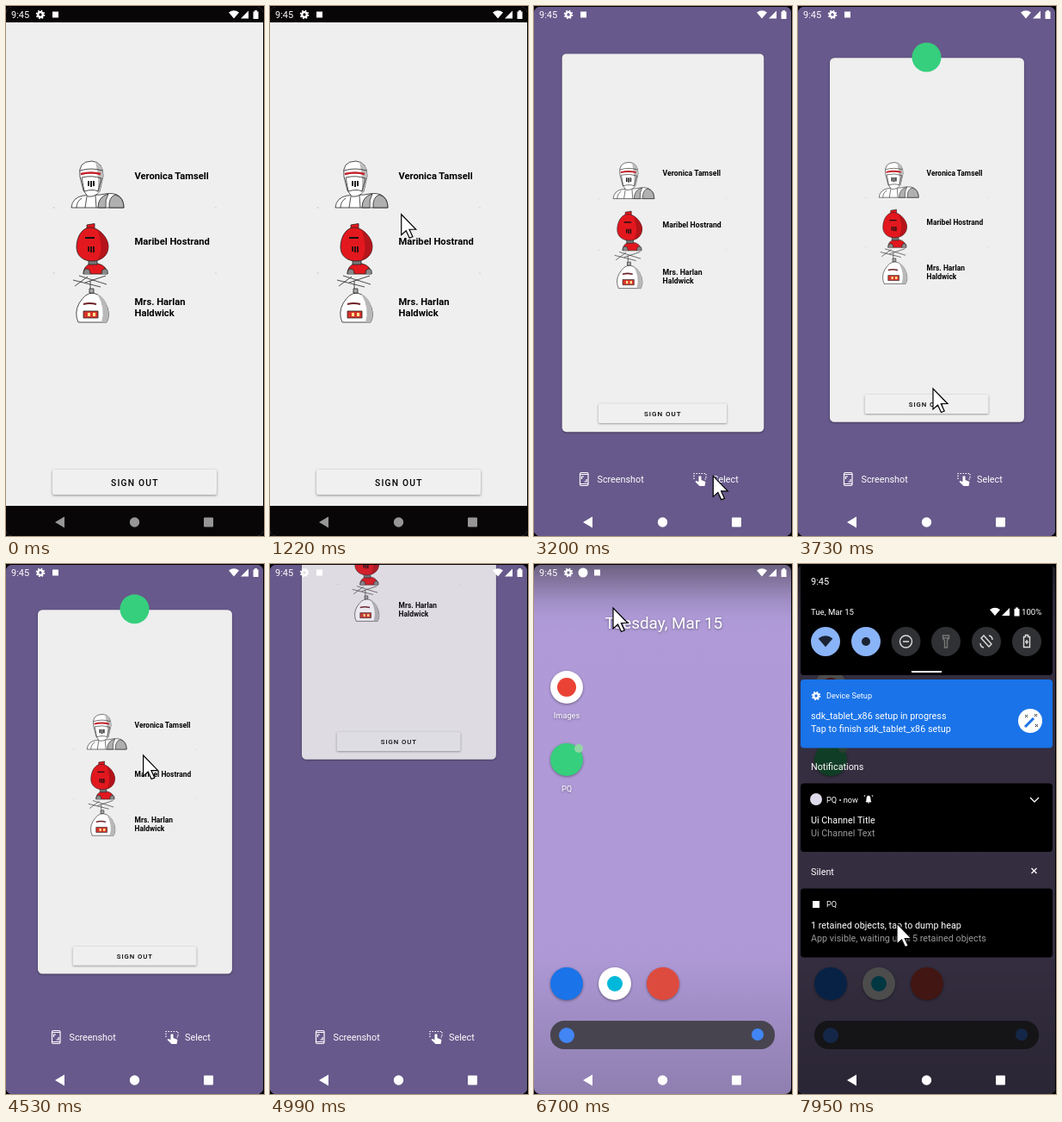
These frames come from a looping animation (300 by 615 pixels, 7990 ms). An HTML page:

```html
<!DOCTYPE html>
<html lang="en">
<head>
<meta charset="utf-8">
<title>Phone screen</title>
<style>
html, body { margin: 0; width: 100%; height: 100%; overflow: hidden; background: #000; }
svg { display: block; width: 100%; height: 100%; font: 10.8px Roboto, sans-serif; color: #fff; }
.line { fill: none; stroke: currentColor; }
.ink { stroke: #222; stroke-width: .8; }
.bold { font-size: 11.2px; font-weight: 700; fill: #000; }
.soft { filter: drop-shadow(0 1px 1.5px #0006); }
.small { font-size: 9.2px; }
.white { fill: #fff; }
.grey { fill: #999; }
</style>
</head>
<body>
<svg viewBox="0 0 300 615" preserveAspectRatio="none">
<defs>
  <linearGradient id="wall" x2="0" y2="1">
    <stop offset="0" stop-color="#6b607f"/>
    <stop offset=".035" stop-color="#8677a2"/>
    <stop offset=".07" stop-color="#a08ec5"/>
    <stop offset=".1" stop-color="#ad99d5"/>
    <stop offset=".13" stop-color="#b09bd8"/>
    <stop offset=".74" stop-color="#ae99d6"/>
    <stop offset=".85" stop-color="#a08dc5"/>
    <stop offset="1" stop-color="#8f7fb0"/>
  </linearGradient>
  <clipPath id="screen"><rect y="1" width="299" height="614" rx="7"/></clipPath>
  <clipPath id="pulled"><rect id="pullArea" width="300"/></clipPath>
  <g id="gear" class="line">
    <circle r="2.8" stroke-width="2.3"/>
    <circle r="4.5" stroke-width="1.6" stroke-dasharray="1.8 1.734"/>
  </g>
  <path id="wifi" d="M0 4.5L-6-2.5Q0-7 6-2.5Z"/>
  <g id="signals" class="white">
    <use href="#wifi"/>
    <path d="M8 4.5H17V-4.5Z"/>
    <path d="M22.5-3.5H24V-5H27V-3.5H28.5V5H22.5Z"/>
  </g>
</defs>

<g clip-path="url(#screen)">
  <rect width="300" height="615" fill="url(#wall)"/>
  <g id="home">
    <g class="soft white" text-anchor="middle">
      <text x="150.8" y="75" font-size="18.9">Tuesday, Mar 15</text>
      <text x="38" y="179" class="small">Images</text>
      <text x="38" y="264" class="small">PQ</text>
    </g>
    <g class="soft">
      <circle cx="38" cy="143" r="19" fill="#fff"/>
      <circle cx="38" cy="227" r="19" fill="#36cf7d"/>
      <circle cx="38" cy="487" r="19" fill="#1a73e8"/>
      <circle cx="94" cy="487" r="19" fill="#fff"/>
      <circle cx="150" cy="487" r="19" fill="#dd4b3e"/>
    </g>
    <circle cx="38" cy="143" r="11" fill="#ea4335"/>
    <circle cx="52" cy="214" r="5" fill="#93d5a5"/>
    <circle cx="94" cy="487" r="9" fill="#00b8d9"/>
    <rect x="19" y="530" width="261" height="33" rx="16" fill="#47444f"/>
    <circle cx="38" cy="547" r="9" fill="#4285f4"/>
    <circle cx="260" cy="546" r="7" fill="#4285f4"/>
  </g>

  <g id="recents">
    <rect width="300" height="615" fill="#67598b"/>
    <g class="white">
      <text x="73.5" y="553">Screenshot</text>
      <text x="208" y="553">Select</text>
    </g>
    <g class="line" stroke-width="1.2">
      <rect x="53.5" y="541.5" width="9.5" height="15" rx="1.5"/>
      <path d="M53.5 543.5H63M53.5 554.5H63M55.5 549V546H58M61 549V552H58.5"/>
      <path d="M186 549V542.5H200V549H197" stroke-dasharray="1.5 1.5"/>
    </g>
    <path class="white" d="M191.5 546q1.5-1.5 3 0v4l5 2-1 5h-6l-5-5 1-1 3 1Z"/>
  </g>
  <rect id="bars" width="300" height="615" fill="#080606"/>

  <g id="card">
    <g class="soft"><rect id="sheet" y="19" width="300" height="561" fill="#efefef"/></g>
    <path class="line" color="#0002" d="M54 234h3M243 234h2M54 310h3M243 310h2"/>

    <g class="ink" fill="#fff">
      <path d="M76 234Q77 222 90 220L110 219Q122 216 129 219Q137 223 137 234Z"/>
      <path d="M107 234Q107 221 119 218Q115 225 116 234ZM120 234Q119 222 127 219Q137 222 137 234Z" fill="#b0b0b0"/>
      <path d="M88 223Q82 227 82 234M94 221L92 234M104 220L105 234" fill="none"/>
      <path d="M86 198Q83 180 100 180Q113 181 113 197L109 215Q104 222 95 221L90 214Z"/>
      <path d="M104 181Q113 184 113 197L109 215L106 219Q109 203 104 181Z" fill="#bdbdbd" stroke="none"/>
      <path d="M86 191Q99 187 112 191M88 199Q100 196 111 200L107 215Q101 212 91 215Z" fill="none"/>
    </g>
    <path class="line" color="#c3222b" stroke-width="2.5" d="M87 195Q99 192 110 195"/>
    <path class="line" color="#222" stroke-width="2" d="M96 203v6M99 203v7M102 203v6"/>

    <g class="ink" fill="#e3181e">
      <path d="M90 311Q90 301 99 299H107Q117 301 118 311Z"/>
      <path d="M96 293H106V300H96Z" fill="#777"/>
      <path d="M94 254L103 252.5V259H94Z"/>
      <path d="M98 257C108 257 119 269 119 279C119 291 109 296 100 296C90 296 82 290 82 280C82 267 89 257 98 257Z"/>
      <path d="M106 259Q119 269 119 279Q118 292 106 295Q115 283 106 259Z" fill="#b4141a" stroke="none"/>
      <path d="M90 311q0-6 4-6t4 6M111 311q0-6 4-6t3 6" fill="#888"/>
    </g>
    <path class="line" color="#1a1010" stroke-width="1.8" d="M92 269H103M96 279v6M99 279v7M102 279v7"/>

    <g class="ink" fill="#fff">
      <path d="M78 318L110 326M85 313L117 323M92 321L116 313M80 325L95 314M98 319V334" fill="none"/>
      <path d="M84 367Q79 356 85 345Q92 333 101 333Q113 335 118 350Q121 360 117 367Z"/>
      <path d="M106 334Q115 338 118 350Q121 360 117 367H111Q116 350 106 334Z" fill="#b9b9b9" stroke="none"/>
      <path d="M97 328h5v5h-5Z" fill="#aaa"/>
      <path d="M90 354H107V362H90Z" fill="#d8332c"/>
      <path d="M95 356h3v4h-3ZM101 356h3v4h-3Z" fill="#ffe28a" stroke="none"/>
    </g>
    <path class="line" color="#6c2229" stroke-width="2" d="M90 346Q97 344 105 346"/>

    <g class="bold">
      <text x="149.5" y="200.5">Veronica Tamsell</text>
      <text x="149.5" y="276.5">Maribel Hostrand</text>
      <text x="149.5" y="346.5">Mrs. Harlan</text>
      <text x="149.5" y="360">Haldwick</text>
    </g>
    <g class="soft"><rect x="54" y="538" width="191" height="29" rx="2" fill="#f0f0f0"/></g>
    <text x="122" y="556.5" font-size="10.3" font-weight="500" letter-spacing="1.2">SIGN OUT</text>
  </g>
  <circle id="appIcon" cx="149.5" cy="59.5" r="17" fill="#36cf7d"/>

  <g id="status">
    <text class="white" x="6" y="14" font-size="11">9:45</text>
    <use href="#gear" x="40" y="10"/>
    <circle id="note" class="white" cx="57" cy="10" r="5.5"/>
    <rect id="heap" class="white" y="6.5" width="7" height="7"/>
    <use href="#signals" x="265" y="10"/>
  </g>

  <rect id="scrim" width="300" height="615"/>
  <ellipse id="ripple" cx="235.5" cy="597.5" fill="#1c1c1c"/>
  <g id="nav">
    <path d="M57 599L68 592.5V605.5Z"/>
    <circle cx="149.5" cy="599" r="5.7"/>
    <rect x="230" y="593.5" width="11" height="11" rx="1"/>
  </g>

  <g clip-path="url(#pulled)"><g id="stack" class="white">
    <rect x="3" y="134" width="293" height="79.5" rx="4" fill="#1a73e8"/>
    <use href="#gear" x="21" y="153"/>
    <text x="33" y="156" class="small">Device Setup</text>
    <text x="15" y="180">sdk_tablet_x86 setup in progress</text>
    <text x="15" y="195">Tap to finish sdk_tablet_x86 setup</text>
    <circle cx="270" cy="182" r="14"/>
    <path class="line" color="#1a73e8" stroke-width="3" d="M264 189L274 179"/>
    <path class="line" color="#333" d="M264 175l3 3m0-3l-3 3M275 174l3 3m0-3l-3 3M276 186l3 3m0-3l-3 3"/>
    <text x="15" y="239">Notifications</text>
    <rect x="3" y="254.5" width="293" height="79.5" rx="4" fill="#000"/>
    <circle cx="21" cy="273" r="7" fill="#dfdae9"/>
    <text x="33" y="277" class="small">PQ • now</text>
    <path d="M79 276q1-1 1-4t2-3 2 3 1 4ZM81 277h2M77 270l1-2M87 270l-1-2" stroke="#fff" stroke-width=".8"/>
    <path class="line" stroke-width="1.3" d="M270 271l5 5 5-5"/>
    <text x="15" y="301">Ui Channel Title</text>
    <text x="15" y="316" class="grey">Ui Channel Text</text>
    <text x="15" y="360.5">Silent</text>
    <path class="line" stroke-width="1.3" d="M271.5 353l6 6m0-6l-6 6"/>
    <rect x="3" y="376.5" width="293" height="80" rx="4" fill="#000"/>
    <rect x="17" y="391" width="8" height="8"/>
    <text x="33" y="398" class="small">PQ</text>
    <text x="15" y="423">1 retained objects, tap to dump heap</text>
    <text x="15" y="438" class="grey">App visible, waiting until 5 retained objects</text>
  </g></g>

  <g id="header">
    <path d="M3-10H296V125q0 4-4 4H7q-4 0-4-4Z"/>
    <g class="white">
      <text x="15" y="24" font-size="11">9:45</text>
      <text x="15" y="59" font-size="9.6">Tue, Mar 15</text>
      <text x="260" y="59" font-size="9.6">100%</text>
    </g>
    <use href="#signals" x="229" y="55.5"/>
    <g fill="#303134">
      <circle cx="32" cy="90" r="17" fill="#8ab4f8"/>
      <circle cx="79" cy="90" r="17" fill="#8ab4f8"/>
      <circle cx="125.5" cy="90" r="17"/><circle cx="172" cy="90" r="17"/>
      <circle cx="219" cy="90" r="17"/><circle cx="266" cy="90" r="17"/>
    </g>
    <use href="#wifi" transform="translate(32 90) scale(1.4)" fill="#1a2233"/>
    <circle cx="79" cy="90" r="5" fill="#1a2233"/>
    <g color="#ddd" stroke-width="1.4">
      <path class="line" d="M122 90h7M118.500 90a7 7 0 1 0 14 0a7 7 0 1 0-14 0"/>
      <path class="line" color="#777" d="M168.500 83h7v3l-2 3v8h-3v-8l-2-3ZM168.500 86h7"/>
      <path class="line" d="M216 83l9 10-3 3-9-10ZM222 83q4 1 4 5M216 97q-4-1-4-5"/>
      <path class="line" d="M262.500 84.500h2v-2h3v2h2v12h-7ZM266 88v5m-2-2.500h4"/>
    </g>
    <path class="line" stroke-width="2" d="M132 125H167"/>
  </g>

  <path id="cursor" d="M0 0V24L5.500 19L9.500 27.500L13.200 26L9.300 17.500H17Z" fill="#fff" stroke="#000" stroke-width="1.2"/>
</g>
</svg>
<script>
const LOOP = 7990;
const el = id => document.getElementById(id);
const set = (id, attrs) => {
  for (const name in attrs) el(id).setAttribute(name, attrs[name]);
};
const clamp = v => Math.max(0, Math.min(1, v));
const part = (t, from, to) => clamp((t - from) / (to - from));
const smooth = p => p * p * (3 - 2 * p);
const easeOut = p => 1 - (1 - p) ** 3;

// time, x, y of the pointer tip
const pointer = [
  [480, 217, 625], [960, 114, 156], [1275, 156, 249], [1820, 231, 600],
  [2080, 231, 600], [2300, 236, 600], [2890, 236, 600], [3670, 157, 444],
  [4080, 157, 444], [4480, 160, 230], [4970, 147, -32], [5730, 147, -32],
  [5840, 143, -5], [6400, 92, 312], [6580, 92, 312], [6700, 92, 51],
  [6930, 90, 15], [7130, 90, 15], [7880, 115, 417], [LOOP, 115, 417]
];

function pointerAt(t) {
  const i = pointer.findIndex(key => key[0] > t);
  if (i < 1) return pointer[0].slice(1);
  const [t0, x0, y0] = pointer[i - 1], [t1, x1, y1] = pointer[i];
  const p = smooth(part(t, t0, t1));
  return [x0 + (x1 - x0) * p, y0 + (y1 - y0) * p];
}

function draw(t) {
  set('cursor', { transform: `translate(${pointerAt(t)})` });

  const lit = Math.round(150 + 105 * part(t, 2080, 2300));
  const press = t < 2570 ? easeOut(part(t, 2180, 2380)) : 0;
  set('nav', { fill: `rgb(${lit},${lit},${lit})` });
  set('ripple', { rx: 38.5 * press, ry: 17 * Math.min(1, press * 2) });

  // app shrinks into its overview card, then is flicked away
  const k = easeOut(part(t, 2890, 3500));
  const flick = -256 * smooth(part(t, 4480, 4990)) - 280 * part(t, 5090, 5200);
  set('bars', { opacity: 1 - part(t, 2890, 3100) });
  set('card', {
    transform: `translate(${37 * k} ${46 * k + flick}) scale(${1 - .247 * k})`,
    opacity: t < 5200 ? 1 + flick / 2048 : 0
  });
  set('sheet', { rx: 7 * k });
  set('appIcon', { transform: `translate(0 ${flick})`, opacity: part(t, 3300, 3600) * (t < 5200) });

  const h = smooth(part(t, 5200, 5570));
  set('recents', { opacity: 1 - h });
  set('home', { transform: `translate(0 ${12 * (1 - h)})` });

  const notified = t >= 6200;
  set('note', { opacity: +notified });
  set('heap', { x: notified ? 70 : 54 });

  // notification shade follows the drag
  const pull = smooth(part(t, 7130, 7880));
  const open = Math.min(1, 2.2 * pull);
  set('scrim', { opacity: .7 * pull });
  set('status', { opacity: 1 - open });
  set('header', { transform: `translate(0 ${-132 * (1 - open)})` });
  set('stack', { transform: `translate(0 ${-90 * (1 - pull)})`, opacity: open });
  set('pullArea', { height: 480 * pull });
}

const start = performance.now();
function tick() {
  draw((performance.now() - start) % LOOP);
  requestAnimationFrame(tick);
}
tick();
</script>
</body>
</html>
```
